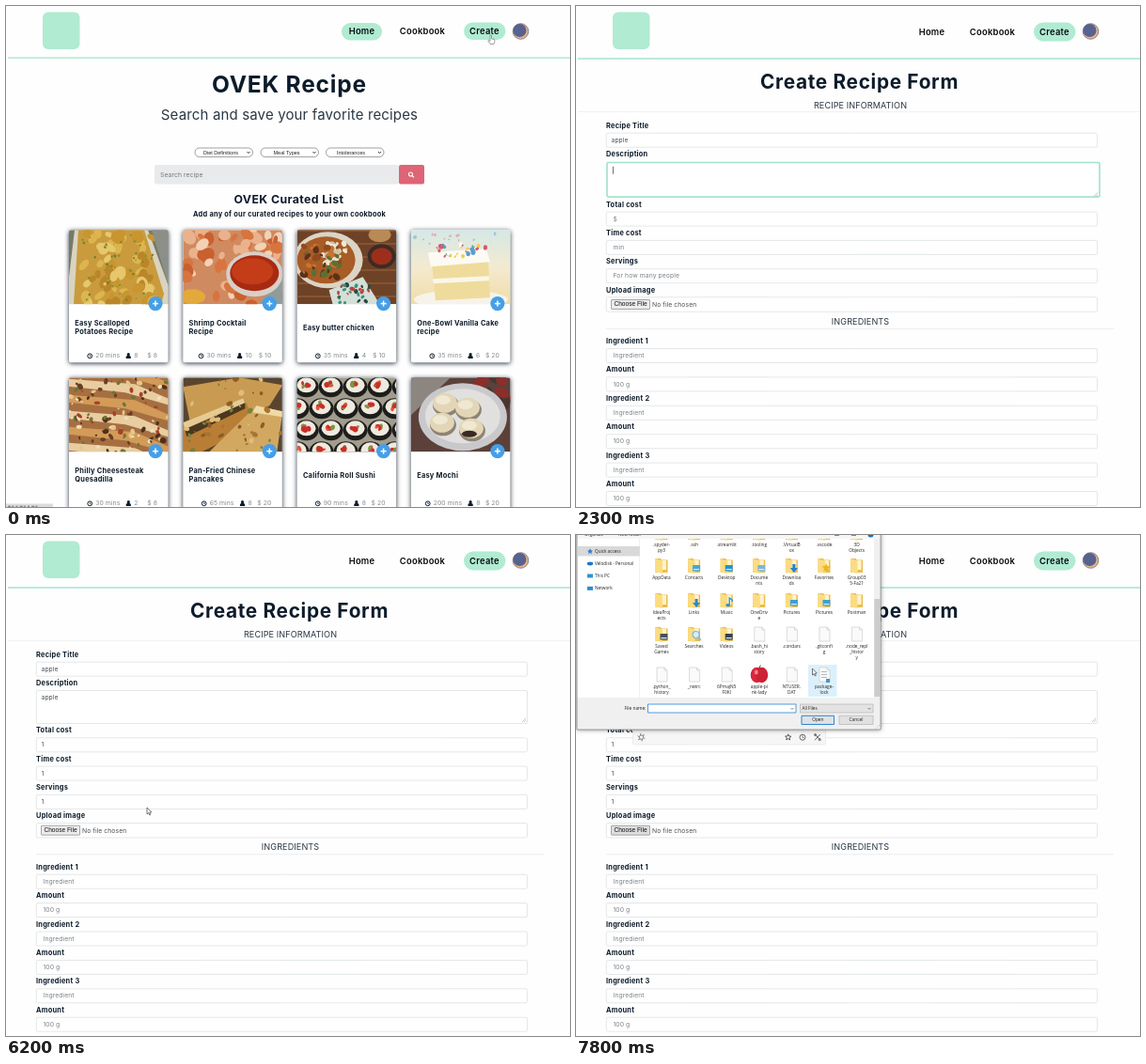
Write an HTML page with a canvas that moves like this. It is 600 px wide and 533 px high and loops after 8 s.

```html
<!DOCTYPE html>
<html lang="en">
<head>
<meta charset="utf-8">
<title>Recipe form</title>
<style>
html, body { margin: 0; width: 100%; height: 100%; overflow: hidden; background: #fefefe; }
canvas { display: block; width: 600px; height: 533px; }
</style>
</head>
<body>
<canvas id="stage"></canvas>
<script>
const W = 600, H = 533, LOOP = 8000, STEP = 100;
const INK = '#0d1b2a', GREEN = '#b0ebd2', LINE = '#a5e3cb', GREY = '#858a90';
const SANS = 'Inter, sans-serif', ARIAL = '"Liberation Sans", Arial, sans-serif', UI = '"Open Sans", sans-serif';
const TRACK = { 400: 0.01, 600: 0.028, 700: 0.033 };

const canvas = document.getElementById('stage');
const ctx = canvas.getContext('2d');
const dpr = window.devicePixelRatio || 1;
canvas.width = W * dpr;
canvas.height = H * dpr;

const lerp = (a, b, k) => a + (b - a) * Math.min(1, Math.max(0, k));

function text(s, x, y, size, { w = 400, c = INK, align = 'left', f = SANS } = {}) {
  ctx.font = `${w} ${size}px ${f}`;
  ctx.letterSpacing = (f === SANS ? size * TRACK[w] : 0) + 'px';
  ctx.textAlign = align;
  ctx.textBaseline = 'middle';
  ctx.fillStyle = c;
  ctx.fillText(s, x, y);
  return ctx.measureText(s).width;
}

function box(x, y, w, h, fill, stroke, r = 0, lw = 0.7) {
  ctx.beginPath();
  ctx.roundRect(x, y, w, h, r);
  if (fill) { ctx.fillStyle = fill; ctx.fill(); }
  if (stroke) { ctx.strokeStyle = stroke; ctx.lineWidth = lw; ctx.stroke(); }
}

function oval(x, y, rx, ry, fill, stroke, lw = 1, rot = 0) {
  ctx.beginPath();
  ctx.ellipse(x, y, rx, ry, rot, 0, 7);
  if (fill) { ctx.fillStyle = fill; ctx.fill(); }
  if (stroke) { ctx.strokeStyle = stroke; ctx.lineWidth = lw; ctx.stroke(); }
}

function path(pts, fill, stroke, lw = 1) {
  ctx.beginPath();
  for (let i = 0; i < pts.length; i += 2) ctx.lineTo(pts[i], pts[i + 1]);
  if (fill) { ctx.closePath(); ctx.fillStyle = fill; ctx.fill(); }
  if (stroke) { ctx.strokeStyle = stroke; ctx.lineWidth = lw; ctx.stroke(); }
}

function at(x, y, draw) {
  ctx.save();
  ctx.translate(x, y);
  draw();
  ctx.restore();
}

function random(seed) {
  return () => {
    seed = (seed + 0x6D2B79F5) | 0;
    let v = Math.imul(seed ^ (seed >>> 15), 1 | seed);
    v = (v + Math.imul(v ^ (v >>> 7), 61 | v)) ^ v;
    return ((v ^ (v >>> 14)) >>> 0) / 4294967296;
  };
}

// ---- shared header ----
function header(home) {
  box(39, 6.5, 39.5, 39.5, GREEN, null, 6);
  if (home) box(357, 18, 43, 18.5, GREEN, null, 9.2);
  box(487, 17.5, 44.5, home ? 18.5 : 20, GREEN, null, 10);
  const nav = { w: 600, c: '#05080c', align: 'center' }, y = home ? 27.6 : 28;
  text('Home', 378.5, y, 9.4, nav);
  text('Cookbook', 443, y, 9.4, nav);
  text('Create', 509, y, 9.4, nav);
  oval(547.5, 27, 8.3, 8.3, '#e6b489', '#4a4460', 0.6);
  oval(546.5, 26, 7, 7, '#56628f');
  box(2, home ? 54.4 : 55.3, 598, 1.4, LINE);
}

function hand(x, y) {
  at(x, y, () => path([-1, -4.5, 0.4, -4.5, 0.6, -0.6, 3.6, 0.2, 4, 2, 3, 5, -1, 5, -3.2, 1.6, -2.6, 0.8, -1, 2, -1, -4.5], '#fff', '#666', 0.6));
}

function arrow(x, y) {
  at(x, y, () => path([0, 0, 0, 7, 1.6, 5.6, 2.8, 8, 3.8, 7.5, 2.7, 5.2, 4.8, 5, 0, 0], '#fff', '#222', 0.6));
}

// ---- home page ----
function scatter(seed, n, colors, r0, r1, x = 0, y = 0, w = 105, h = 79) {
  const rnd = random(seed);
  for (let i = 0; i < n; i++) {
    const r = lerp(r0, r1, rnd());
    oval(x + rnd() * w, y + rnd() * h, r, r * (0.5 + rnd() * 0.4), colors[i % colors.length], null, 0, rnd() * 3);
  }
}

const fill = c => box(0, 0, 106, 79, c);
const photos = [
  () => {
    fill('#77796a');
    path([6, 0, 84, 0, 106, 60, 106, 79, 0, 79, 0, 50], '#d9d4c2');
    path([10, 0, 80, 0, 101, 68, 98, 79, 5, 79], '#c99b3d');
    scatter(3, 70, ['#dcb54f', '#c8952f', '#e6c76b', '#b98629'], 4, 8, 13, 2, 76, 77);
    scatter(4, 40, ['#6f7f2e', '#8a8b35'], 0.8, 1.8, 13, 2, 76, 74);
    path([88, 0, 106, 0, 106, 60], '#8b8f88');
  },
  () => {
    fill('#d08a60');
    scatter(8, 60, ['#eab28c', '#d8743f', '#f2d2b4', '#c9602f'], 4, 9);
    path([80, 79, 106, 50, 106, 79], '#8f9c98');
    oval(76, 47, 30, 24, '#d8cfc6');
    oval(76, 46, 26, 19, '#a82a12');
    oval(74, 44, 22, 14, '#c43c18');
    oval(10, 71, 14, 8, '#e3a93b');
  },
  () => {
    fill('#6e4226');
    for (let i = 0; i < 6; i++) box(0, i * 14, 106, 1.5, '#8c5a38');
    oval(33, 32, 37, 30, '#dcd4c5');
    oval(31, 32, 31, 25, '#a85c26');
    scatter(12, 26, ['#e8dfcb', '#f0e8d8', '#cfc3a6'], 2, 5, 26, 13, 28, 24);
    scatter(13, 40, ['#c8742d', '#8f4a1e', '#5c7032', '#5d3018'], 1.5, 5, 6, 14, 40, 38);
    oval(90, 28, 15, 13, '#3d2b24');
    oval(90, 28, 11, 9, '#9c2f1c');
    oval(88, 5, 12, 8, '#b98a55');
    path([34, 64, 70, 50, 88, 79, 38, 79], '#d4dfd7');
    scatter(15, 26, ['#3b9280', '#b64742', '#2c4a44'], 1.5, 3, 42, 58, 36, 20);
  },
  () => {
    const g = ctx.createLinearGradient(0, 0, 0, 79);
    g.addColorStop(0, '#d5e8e6');
    g.addColorStop(0.5, '#f3ead0');
    g.addColorStop(1, '#f0dca6');
    fill(g);
    oval(53, 74, 50, 10, '#f7f3ea');
    path([22, 34, 82, 29, 84, 72, 26, 75], '#efdb9c');
    path([23, 52, 83, 49, 83, 54, 24, 57], '#fbf6e8');
    path([18, 24, 80, 20, 84, 34, 21, 39], '#fcfaf2');
    scatter(18, 34, ['#d25a73', '#5b9ec9', '#efd04e', '#fff'], 1, 3, 24, 15, 58, 14);
    scatter(19, 12, ['#e3a9b4', '#9dc8dc'], 1, 2.4, 4, 4, 96, 12);
  },
  () => {
    fill('#a66f41');
    for (let i = 0; i < 6; i++) {
      const y = i * 17 - 16;
      path([-5, y, 70, y + 6, 112, y + 24, 112, y + 30, 60, y + 15, -5, y + 8], i % 2 ? '#e8cda0' : '#d29b57');
    }
    scatter(22, 110, ['#6b3d24', '#e6c68d', '#a93f28', '#6d7636', '#f0dfbd', '#4b3020'], 1, 3.6);
  },
  () => {
    fill('#59452f');
    path([0, 10, 60, 0, 106, 8, 92, 30, 10, 60], '#c99b52');
    path([0, 48, 64, 22, 80, 50, 20, 79, 0, 79], '#b87e35');
    path([28, 79, 78, 30, 106, 36, 100, 79], '#d2a861');
    path([0, 48, 64, 22, 66, 27, 2, 55], '#e5cb93');
    path([2, 55, 66, 27, 66, 33, 4, 63], '#4a3820');
    path([78, 30, 106, 36, 106, 42, 74, 37], '#efd9a6');
    scatter(26, 50, ['#8f5c25', '#a77434', '#78803c', '#e0bd7c'], 1, 3.6);
  },
  () => {
    fill('#a29c8e');
    for (let r = 0; r < 4; r++) for (let c = 0; c < 5; c++) {
      const x = 10 + c * 26 - (r % 2) * 10, y = 8 + r * 23;
      oval(x, y + 2, 13, 11, '#1d1e1b');
      oval(x, y, 10, 8, '#eeeae0');
      scatter(r * 5 + c, 4, ['#c92f28', '#e4513b', '#7d9447'], 2, 4, x - 4, y - 3, 7, 5);
    }
  },
  () => {
    fill('#5b413a');
    path([0, 0, 42, 0, 0, 40], '#8d8580');
    scatter(31, 18, ['#8a2f2c', '#493630'], 4, 10, 60, 0, 45, 30);
    oval(55, 42, 47, 36, '#c9c9cb');
    oval(55, 41, 40, 29, '#e1e0df');
    for (const [x, y] of [[36, 27], [60, 32], [33, 48], [64, 54]]) {
      oval(x + 1, y + 2.5, 14, 11.5, '#8f8474');
      oval(x, y, 13, 10.5, '#e2d6b6');
      oval(x - 2, y - 3, 8, 5, '#efe8d2');
    }
    oval(62, 60, 8, 3.5, '#3a2a24');
  }
];

const recipes = [
  ['Easy Scalloped|Potatoes Recipe', 20, 8, 8], ['Shrimp Cocktail|Recipe', 30, 10, 10],
  ['Easy butter chicken', 35, 4, 10], ['One-Bowl Vanilla Cake|recipe', 35, 6, 20],
  ['Philly Cheesesteak|Quesadilla', 30, 2, 8], ['Pan-Fried Chinese|Pancakes', 65, 8, 20],
  ['California Roll Sushi', 90, 8, 20], ['Easy Mochi', 200, 8, 20]
];

function card([title, mins, people, cost], i) {
  at(67 + (i % 4) * 121.3, 238.3 + (i >> 2) * 157, () => {
    ctx.save();
    ctx.shadowColor = 'rgba(13,27,42,.9)';
    ctx.shadowBlur = 5 * dpr;
    ctx.shadowOffsetY = dpr;
    box(0, 0, 105.5, 141, '#fff', null, 2);
    ctx.restore();
    ctx.save();
    ctx.beginPath();
    ctx.roundRect(0, 0, 105.5, 79, [2, 2, 0, 0]);
    ctx.clip();
    photos[i]();
    ctx.restore();
    oval(92, 78.3, 7.6, 7.6, '#459fe8');
    path([89, 78.3, 95, 78.3], null, '#fff', 1.5);
    path([92, 75.3, 92, 81.3], null, '#fff', 1.5);
    const lines = title.split('|');
    lines.forEach((s, k) => text(s, 6.3, 104.5 - (lines.length - 1) * 5.2 + k * 9.6, 7.4, { w: 700 }));
    const meta = { c: GREY, align: 'right' }, y = 134;
    text('$ ' + cost, 94, y, 6.8, meta);
    let x = 73.5 - text(String(people), 73.5, y, 6.8, meta) - 6;
    oval(x, y - 1.6, 1.6, 1.7, INK);
    box(x - 2.6, y - 0.2, 5.2, 3, INK, null, [1.5, 1.5, 0.5, 0.5]);
    x -= 9;
    x -= text(mins + ' mins', x, y, 6.8, meta) + 6;
    oval(x, y, 2.4, 2.4, null, INK, 1);
    path([x, y - 1.5, x, y + 0.3, x + 1.2, y + 0.3], null, INK, 0.7);
  });
}

function homePage() {
  header(true);
  const mid = { align: 'center' }, bold = { w: 700, align: 'center' };
  text('OVEK Recipe', 301.5, 84.5, 24.5, bold);
  text('Search and save your favorite recipes', 301.5, 116.6, 15, { ...mid, c: '#2b3744' });
  [['Diet Definitions', 201, 210], ['Meal Types', 271, 284.5], ['Intolerances', 340.5, 352]].forEach(([s, x, tx]) => {
    box(x, 151, 61.5, 9.6, '#fff', '#777', 4.8, 0.7);
    text(s, tx, 156, 5.5, { f: ARIAL, c: '#222' });
    path([x + 55.5, 155, x + 57, 156.6, x + 58.5, 155], null, '#222', 0.9);
  });
  box(158, 169, 260, 20.5, '#e9eaeb', null, 2);
  text('Search recipe', 164, 179.7, 6.8, { c: '#777' });
  box(418, 169, 27, 20.5, '#dd6575', null, 2);
  oval(430.5, 179, 2, 2, null, '#fff', 1.1);
  path([432, 180.5, 434, 182.4], null, '#fff', 1.3);
  text('OVEK Curated List', 301, 206.4, 12.3, bold);
  text('Add any of our curated recipes to your own cookbook', 301.5, 222.2, 7.4, bold);
  recipes.forEach(card);
}

// ---- form page ----
const fields = [
  { label: 'Recipe Title', hint: 'Enter your recipe name', from: 1000, to: 2200, keys: [[1500, 'a'], [1700, 'ap'], [1800, 'app'], [1900, 'appl'], [2100, 'apple']] },
  { label: 'Description', hint: '', from: 2200, to: 2900, keys: [[2600, 'app'], [2700, 'apple']], tall: true },
  { label: 'Total cost', hint: '$', from: 2900, to: 4300, keys: [[4000, '1']] },
  { label: 'Time cost', hint: 'min', from: 4300, to: 5300, keys: [[5000, '1']] },
  { label: 'Servings', hint: 'For how many people', from: 5300, to: 5900, keys: [[5600, '1']] }
];

const label = (s, y) => text(s, 32, y + 0.5, 7.4, { w: 700 });
const heading = (s, y) => text(s, 302.5, y, 9.1, { align: 'center', c: '#2b3744' });

function field(f, y, t) {
  label(f.label, y);
  const focus = t >= f.from && t < f.to;
  const h = f.tall ? 35 : 15, grow = focus ? 3.3 : 0, top = y + 8.2;
  if (focus) box(33, top + 1, 524, h + 1.6, '#fff', LINE, 1.5, 1.7);
  else box(32.3, top, 522.2, h, '#fff', '#d9dde1', 1.5);
  const key = f.keys.filter(k => t >= k[0]).pop();
  const value = key ? key[1] : '';
  const ty = top + 7.5 + grow / 2, x = focus ? 39.3 : 37.5;
  const w = value ? text(value, x, ty, 6.8, { c: '#495057' }) : 0;
  if (!value) text(f.hint, x + 2, ty, 6.8, { c: '#7b8288' });
  if (focus && t - Math.max(f.from, key ? key[0] : 0) < 600) box(x + w, ty - 4, 0.7, 8, '#333');
  if (f.tall) {
    const by = top + h + grow - 1.5, bx = focus ? 555 : 553;
    path([bx - 4, by, bx, by - 4], null, '#888', 0.5);
    path([bx - 1.8, by, bx, by - 1.8], null, '#888', 0.5);
  }
  return y + h + grow + 15.3;
}

function formPage(t) {
  header(false);
  text('Create Recipe Form', 301.5, 81.5, 20.8, { w: 700, align: 'center' });
  heading('RECIPE INFORMATION', 106.6);
  box(2, 112.3, 598, 0.7, '#eceeee');
  let y = 127;
  for (const f of fields) y = field(f, y, t);
  label('Upload image', y);
  box(32.3, y + 8, 522.2, 15.5, '#fff', '#d9dde1', 1.5);
  box(37.5, y + 10.7, 41, 10, t >= 6800 ? '#dedede' : '#ececec', '#858585', 0.5);
  text('Choose File', 58, y + 15.8, 6.6, { f: ARIAL, align: 'center', c: '#111' });
  text('No file chosen', 81, y + 16, 6.8, { c: '#495057' });
  heading('INGREDIENTS', y + 34);
  box(32, y + 41, 540, 0.7, '#e4e6e7');
  for (let i = 0; i < 6; i++) {
    const ly = y + 54.5 + i * 30.4;
    label(i % 2 ? 'Amount' : 'Ingredient ' + (i / 2 + 1), ly);
    box(32.3, ly + 8.2, 522.2, 15, '#fff', '#d9dde1', 1.5);
    text(i % 2 ? '100 g' : 'Ingredient', 39.5, ly + 15.8, 6.8, { c: '#7b8288' });
  }
}

// ---- file dialog ----
const rows = [
  '.anaconda .android .cache .conda .config .docker .eclipse',
  '.gradle .ipython .jupyter .keras .m2 .matplotl|ib .npm',
  '.spyder-|py3 .ssh .streamlit .tooling .VirtualB|ox .vscode 3D|Objects',
  'AppData Contacts Desktop Docume|nts Downloa|ds Favorites Group03|5-Fa21',
  'IdeaProj|ects Links Music OneDriv|e Pictures Pictures Postman',
  'Saved_Games Searches Videos .bash_hi|story .condarc .gitconfi|g .node_repl|_histor|y',
  '.python_|history _netrc 6PmajN5|F0Kl apple-pi|nk-lady NTUSER.|DAT package-|lock'
].map(r => r.split(' '));
const rowY = [-63, -26, 11, 46, 83, 119, 162];
const badges = {
  Contacts: '#48a4dc', Desktop: '#1f94d6', 'Docume|nts': '#7fb4d8', 'Downloa|ds': '#1d82d8', Favorites: '#eab72c',
  Links: '#2b86cf', Music: '#228ddb', Pictures: '#3f9fd0', Saved_Games: '#45525c', Searches: '#7fb6dc', Videos: '#37424e'
};

function fileIcon(name) {
  path([-5, -7, 3, -7, 6, -4, 6, 8, -5, 8], '#fafafa', '#c4c4c4', 0.6);
  path([3, -7, 3, -4, 6, -4], null, '#c4c4c4', 0.6);
  if (name.startsWith('package')) {
    for (let i = 0; i < 3; i++) box(-3, -3 + i * 3, 6, 0.8, '#9aa');
    box(2, 5, 4, 4, '#4a94cc');
  }
}

function folderIcon(name) {
  path([-6.5, -7, -1, -7, 0, -5.5, 6.5, -5.5, 6.5, 8, -6.5, 8], '#e9bd4e');
  box(-2, -5, 7, 10, '#fff4cf');
  path([-6.5, -7, 1, -4.5, 1, 9, -6.5, 7.5], '#fbdc80');
  const c = badges[name];
  if (!c) return;
  if (name === 'Searches') {
    oval(2, 1, 3.5, 3.5, '#d7edf9', c, 1.2);
    path([4.5, 3.5, 7, 7], null, c, 1.6);
  } else if (name === 'Favorites') {
    path([2, -2, 3.3, 1, 7, 1.4, 4.4, 3.6, 5.2, 7, 2, 5.2, -1, 7, 0, 3.6, -2.6, 1.4, 0.8, 1], c);
  } else if (name === 'Downloa|ds' || name === 'Links') {
    path([1, -1, 4, -1, 4, 3, 6.5, 3, 2.5, 8, -1.5, 3, 1, 3], c);
  } else if (name === 'Music') {
    oval(1.4, 5.6, 2.2, 1.7, c);
    path([3, 5.6, 3, -2, 6, 0, 6, 2], null, c, 1.3);
  } else {
    box(-1.5, 0, 8, 6.5, c);
    box(-0.5, 4, 6, 1.2, '#dcebf2');
  }
}

function fileList(scroll, hover) {
  ctx.save();
  ctx.beginPath();
  ctx.rect(68, 4, 249, 169);
  ctx.clip();
  rows.forEach((row, r) => row.forEach((name, c) => {
    const x = 91 + c * 34.6, y = rowY[r] + 100 - scroll;
    if (hover && name.startsWith('package')) box(247, y - 24, 30.5, 34, '#dcf0fc');
    at(x, y - 14, () => {
      if (name.startsWith('apple')) {
        oval(-2.5, 1, 6.6, 8.3, '#d9263c');
        oval(2.8, 1, 6.6, 8.3, '#cf2036');
        oval(-3, -2, 2, 2.6, '#f0828a');
        path([0, -6, 1.5, -9.5], null, '#5c4124', 1);
      } else if (r === 6 || (r === 5 && c > 2)) fileIcon(name);
      else folderIcon(name);
    });
    const lines = name.replace('_G', '|G').split('|');
    lines.forEach((s, k) => text(s, x, y + k * 6.1, 4.8, { f: UI, align: 'center', c: '#222' }));
  }));
  ctx.restore();
  box(317, 4, 6.5, 169, '#f0f0f0');
  box(317.3, lerp(5, 68, scroll / 100), 6, 104, '#cdcdcd');
}

function dialogBody(scroll, hover) {
  const ui = { f: UI, c: '#222' };
  box(1, -11, 323, 15, '#f5f6f7');
  text('Organize', 9, -0.6, 4.8, ui);
  text('New folder', 45, -0.6, 4.8, ui);
  box(275, -2, 5, 3, '#7d8b95');
  box(293, -2, 5, 3, '#7d8b95');
  oval(313.5, -0.5, 3, 3, '#1673c4');
  box(2, 12, 66, 10.5, '#d9d9d9');
  [['Quick access', 17.3, '#2d7fd3'], ['Velodisk - Personal', 30.5, '#1a78c8'], ['This PC', 43.7, '#3292d0'], ['Network', 57, '#2f8cc9']].forEach(([s, y, c], i) => {
    if (i === 1) oval(15, y, 3.2, 1.9, c);
    else if (i === 0) path([15, y - 3, 16, y - 1, 18, y - 0.6, 16.4, y + 0.8, 17, y + 3, 15, y + 1.8, 13, y + 3, 13.6, y + 0.8, 12, y - 0.6, 14, y - 1], c);
    else box(12, y - 2.2, 6, 4, c);
    text(s, 20, y, 4.7, ui);
  });
  fileList(scroll, hover);
  box(1, 173, 323, 34, '#f0f0f0');
  box(67.5, 4, 0.5, 169, '#e2e2e2');
  text('File name:', 74.5, 184.8, 4.8, { ...ui, align: 'right' });
  box(76.5, 180, 157.5, 9, '#fff', '#2a84d6', 0, 0.8);
  box(238.5, 180, 77.5, 9, '#e3e3e3', '#b3b3b3');
  text('All Files', 240.5, 184.7, 4.7, ui);
  for (const x of [230, 312]) path([x - 1.5, 184, x, 185.5, x + 1.5, 184], null, '#555', 0.7);
  box(240, 192.3, 34.5, 9.2, '#e1e1e1', '#2a84d6', 0, 1);
  box(280, 192.3, 36, 9.2, '#e1e1e1', '#b3b3b3');
  text('Open', 257.3, 197, 4.8, { ...ui, align: 'center' });
  text('Cancel', 298, 197, 4.8, { ...ui, align: 'center' });
  for (let i = 0; i < 3; i++) box(322 - i * 1.6, 202.2 + i * 1.6, 0.8, 0.8, '#aaa');
}

function popupBar(t) {
  box(60.5, 207, 205, 16, '#f6f6f6', '#e6e6e6', 1);
  if (t < 7300) box(233, 208, 16, 14, '#e8e8e8');
  oval(69.5, 215.2, 2.2, 2.2, null, '#777', 0.8);
  for (let i = 0; i < 6; i++) {
    const a = i * Math.PI / 3;
    path([69.5 + 2 * Math.cos(a), 215.2 + 2 * Math.sin(a), 69.5 + 4.3 * Math.cos(a + 0.4), 215.2 + 4.3 * Math.sin(a + 0.4)], null, '#777', 0.9);
  }
  const star = [];
  for (let i = 0; i <= 10; i++) {
    const a = i * Math.PI / 5 - Math.PI / 2, r = i % 2 ? 1.5 : 3.3;
    star.push(225.7 + r * Math.cos(a), 215.2 + r * Math.sin(a));
  }
  path(star, null, '#333', 0.8);
  oval(241, 215.2, 3, 3, null, '#444', 0.8);
  path([241, 213.3, 241, 215.4, 242.5, 215.8], null, '#444', 0.7);
  path([254, 212, 260, 218.3], null, '#666', 1);
  path([259.8, 212, 254, 218.3], null, '#666', 1);
  oval(254.6, 212.6, 1.1, 1.1, null, '#444', 0.7);
  oval(259.2, 217.6, 1.1, 1.1, null, '#444', 0.7);
}

function dialog(t) {
  const alpha = t < 7200 ? 0.2 : t < 7300 ? 0.85 : 1;
  const scale = lerp(0.943, 1, alpha);
  ctx.save();
  ctx.globalAlpha = alpha;
  ctx.translate(162.5, 98);
  ctx.scale(scale, scale);
  ctx.translate(-162.5, -98);
  if (t < 7200) {
    box(1, -11, 323, 218, '#fff', '#bbb', 0, 1);
    box(0, -11, 325, 219.5, null, '#ddd', 1, 1.5);
  } else {
    ctx.save();
    ctx.shadowColor = 'rgba(0,0,0,.5)';
    ctx.shadowBlur = 5 * dpr;
    box(1, -11, 323, 218, '#fff');
    ctx.restore();
    dialogBody(t < 7700 ? 0 : t < 7800 ? 55 : 100, t >= 7800);
    box(1, -11, 323, 218, null, '#8d8d8d', 0, 0.8);
  }
  ctx.restore();
}

// ---- timeline ----
function draw(t) {
  ctx.setTransform(dpr, 0, 0, dpr, 0, 0);
  box(0, 0, W, H, '#fefefe');
  if (t < 200) homePage();
  else formPage(t);
  if (t < 600) {
    box(0, 529.5, 50, 4, '#dcdcdc');
    for (let i = 0; i < 8; i++) box(2 + i * 4.2, 531.6, i % 3 ? 2 : 3, 1.4, '#888');
  }
  if (t < 800) {
    const k = (t - 100) / 300, m = (t - 400) / 500;
    const x = lerp(lerp(516, 478, k), 330, m), y = lerp(lerp(35.5, 59, k), 140, m);
    if (t >= 200 && t < 500) oval(x - 1, y - 2, 4.6, 4.6, 'rgba(225,70,70,.55)');
    hand(x, y);
  }
  if (t >= 6200 && t < 6900) {
    const k = (t - 6200) / 400;
    arrow(lerp(150, 60, k), lerp(290, 314, k));
  }
  if (t >= 7000) popupBar(t);
  if (t >= 7100) dialog(t);
  if (t >= 7500) {
    const k = (t - 7500) / 300;
    arrow(lerp(275, 251.5, k), lerp(120, 142, k));
  }
}

const start = performance.now();
let shown = -1;
function tick() {
  const t = Math.floor(((performance.now() - start) % LOOP) / STEP) * STEP;
  if (t !== shown) draw(shown = t);
  requestAnimationFrame(tick);
}
tick();
</script>
</body>
</html>
```
